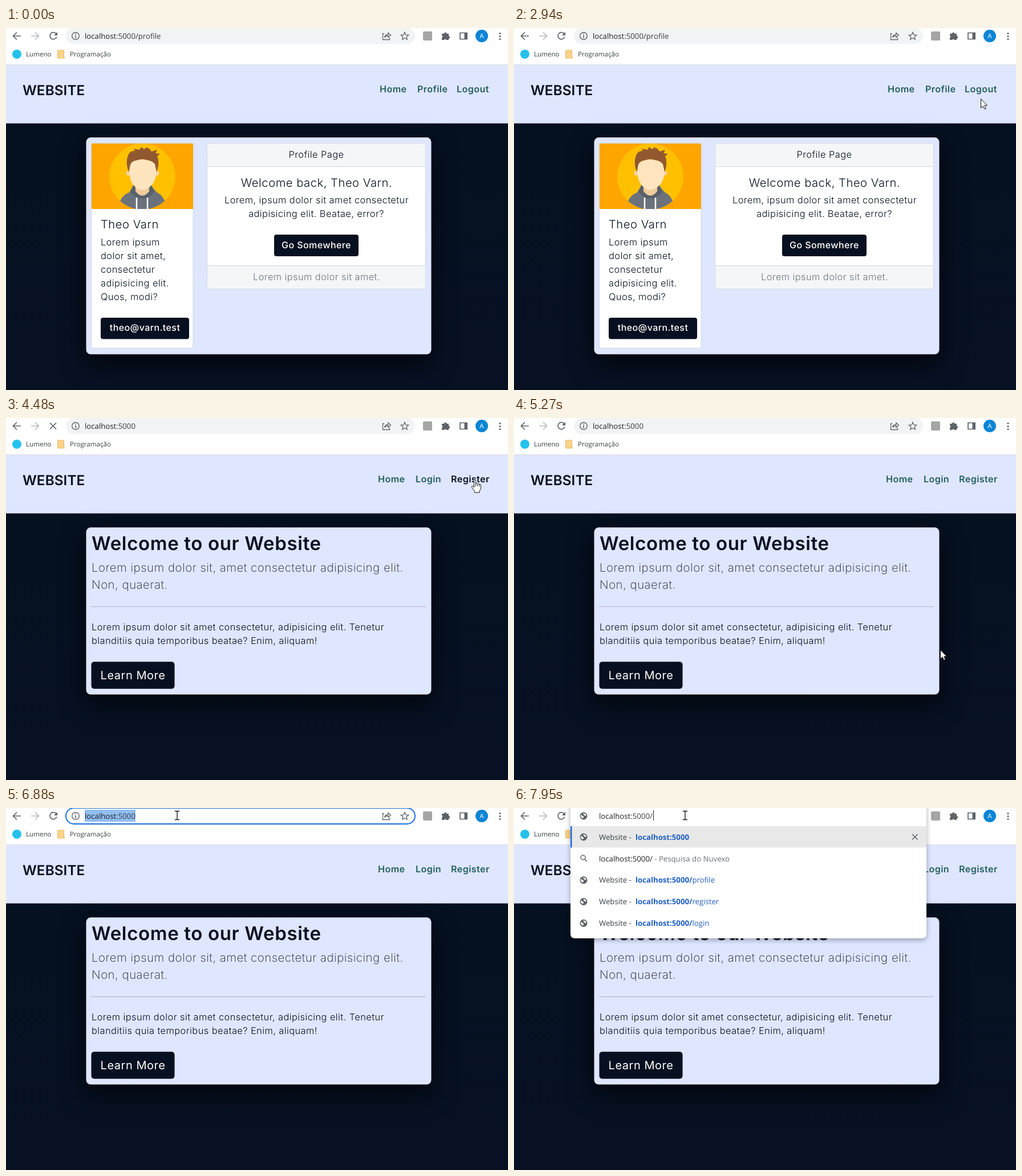
An HTML page for the animation above (8 s loop, 880 px wide and 636 px high).

```html
<!DOCTYPE html>
<html lang="pt">
<head>
<meta charset="utf-8">
<title>Website</title>
<style>
html,body{margin:0;width:100%;height:100%;overflow:hidden;background:#fff}
svg{display:block;width:880px;height:636px}
text{font-family:Inter,sans-serif;text-rendering:geometricPrecision;fill:#071020;white-space:pre}
.page text{letter-spacing:.026em}
.ui{font-family:"Open Sans",sans-serif;font-size:13.2px;fill:#3c4043}
.small{font-size:11.6px}
.nav text{font-size:16.1px;font-weight:600;fill:#235f60}
.nav text.hot{fill:#071020}
.p{font-size:16.4px;font-weight:300}
.h5{font-size:20.2px;font-weight:300}
.page .lead{font-size:20.4px;font-weight:200;fill:#1a2233}
.page .title{font-size:33px;font-weight:600;letter-spacing:.02em}
.btn{font-size:16px;font-weight:500}
.page .btn,.page .big{fill:#fff}
.mid{text-anchor:middle}
.shade{filter:drop-shadow(0 16px 22px rgba(0,0,0,.68))}
.ln{fill:none;stroke:#5f6368;stroke-width:1.7}
.bold{font-weight:700}
.blue{fill:#1f5fc4}
</style>
</head>
<body>
<svg viewBox="0 0 880 636">
  <defs>
    <linearGradient id="night" x2="0" y2="1"><stop stop-color="#051020"/><stop offset="1" stop-color="#071123"/></linearGradient>
    <clipPath id="photo"><rect x="150" y="203" width="178" height="115"/></clipPath>
    <clipPath id="disc"><circle cx="239" cy="261" r="58"/></clipPath>
    <g id="globe"><circle r="6.5" fill="#5f6368"/><path d="M-4.5-2.5Q-3 0 0 .5Q.5 2-1 4Q-5 3-5 0ZM0-5Q4-4 4.8-1Q2 1 1.5-1.5Q-1-2 0-5Z" fill="#fff"/></g>
  </defs>

  <g class="page">
    <rect y="65" width="880" height="103" fill="#dfe6ff"/>
    <rect y="167.600" width="880" height="469" fill="url(#night)"/>
    <text x="29" y="118" font-size="24.300" font-weight="600" style="letter-spacing:.003em">WEBSITE</text>

    <g id="profile">
      <g class="nav"><text x="655" y="113">Home</text><text x="721" y="113">Profile</text><text id="logout" x="790" y="113">Logout</text></g>
      <rect class="shade" x="140.500" y="192.300" width="605" height="381" rx="8" fill="#dfe6ff"/>
      <rect x="149.500" y="202.500" width="178.500" height="360" rx="3" fill="#fff" stroke="#d3d8e4"/>
      <g clip-path="url(#photo)">
        <rect x="150" y="203" width="178" height="115" fill="#ffa500"/>
        <circle cx="239" cy="261" r="58" fill="#ffc000"/>
        <g clip-path="url(#disc)">
          <path d="M196 319Q199 295 216 289Q221 280 224 275H254Q259 284 265 289Q279 296 282 319Z" fill="#6b727c"/>
          <path d="M224 275Q239 300 254 275L260 288Q239 312 218 288Z" fill="#59616b"/>
          <path d="M227 272H251V287Q239 302 227 287Z" fill="#f0cd9b"/>
          <path d="M229 298V318M248 298V318" stroke="#fff" stroke-width="2.500"/>
        </g>
        <circle cx="215" cy="255" r="4.500" fill="#f5d3a4"/><circle cx="264" cy="255" r="4.500" fill="#f5d3a4"/>
        <path d="M217 236Q239 225 263 237V260Q260 276 246 283Q239 286 232 283Q219 276 217 260Z" fill="#ffe5bd"/>
        <path d="M215 253Q209 236 214 224Q217 215 226 216L224 212L234 214L237 209L242 213L246 210Q252 211 255 217L265 214L262 220L270 221L265 225Q270 237 264 253L261 239Q256 233 247 232Q239 229 231 232Q221 233 218 240Z" fill="#91592f"/>
      </g>
      <text class="h5" x="166" y="352">Theo Varn</text>
      <g class="p" id="bio"></g>
      <rect x="166" y="509" width="155" height="37.500" rx="4" fill="#071020"/>
      <text class="btn mid" x="243.500" y="532">theo@varn.test</text>

      <rect x="352.500" y="202.500" width="383" height="256" rx="3" fill="#fff" stroke="#d3d8e4"/>
      <path d="M353 203H735V243.500H353ZM353 417.500H735V458H353Z" fill="#f4f6f7"/>
      <path d="M353 243.500H735M353 417.500H735" stroke="#d3d6d9"/>
      <g class="mid">
        <text class="p" x="544" y="228">Profile Page</text>
        <text class="h5" x="544.500" y="279">Welcome back, Theo Varn.</text>
        <text class="p" x="544.500" y="308">Lorem, ipsum dolor sit amet consectetur</text>
        <text class="p" x="544" y="332">adipisicing elit. Beatae, error?</text>
        <rect x="470" y="363" width="148" height="38" rx="4" fill="#071020"/>
        <text class="btn" x="544" y="387">Go Somewhere</text>
        <text class="p" x="544.500" y="443" style="fill:#6c757d">Lorem ipsum dolor sit amet.</text>
      </g>
    </g>

    <g id="home">
      <g class="nav"><text x="652" y="113">Home</text><text x="718" y="113">Login</text><text id="register" x="780" y="113">Register</text></g>
      <rect class="shade" x="140.500" y="192.300" width="605" height="293.500" rx="8" fill="#dfe6ff"/>
      <text class="title" x="150" y="232">Welcome to our Website</text>
      <text class="lead" x="150" y="270">Lorem ipsum dolor sit, amet consectetur adipisicing elit.</text>
      <text class="lead" x="150" y="300">Non, quaerat.</text>
      <path d="M149 331.500H736" stroke="#aeb5c8"/>
      <text class="p" x="150" y="373">Lorem ipsum dolor sit amet consectetur, adipisicing elit. Tenetur</text>
      <text class="p" x="150" y="397">blanditiis quia temporibus beatae? Enim, aliquam!</text>
      <rect x="149.500" y="428.200" width="146" height="47.500" rx="5" fill="#071020"/>
      <text class="mid big" x="222.500" y="459" font-size="20">Learn More</text>
    </g>
  </g>

  <rect width="880" height="64" fill="#fff"/>
  <path d="M0 64.500H880" stroke="#dcdee2"/>
  <path class="ln" d="M26 14H13M19 7.500L12.500 14L19 20.500"/>
  <path class="ln" d="M44 14H57M51 7.500L57.500 14L51 20.500" style="stroke:#b9bbbe"/>
  <g id="reload"><path class="ln" d="M87.800 10A6 6 0 1 0 88.800 15.500"/><path d="M90 7V13H84Z" fill="#5f6368"/></g>
  <path id="stop" class="ln" d="M77 8.500L88 19.500M88 8.500L77 19.500"/>
  <rect x="105" width="612" height="28" rx="14" fill="#f1f3f4"/>
  <rect id="ring" x="105" width="612" height="28" rx="14" fill="#fff" stroke="#1a6fe0" stroke-width="2"/>
  <circle class="ln" cx="122" cy="14" r="6.300" style="stroke-width:1.4"/>
  <path d="M122 10V11.600M122 13V18" stroke="#5f6368" stroke-width="1.600"/>
  <rect id="sel" x="138" y="3" width="89" height="21" fill="#90bdf2"/>
  <text class="ui" x="138" y="18.500"><tspan fill="#202124">localhost</tspan>:5000<tspan id="path">/profile</tspan></text>
  <path id="caret" d="M227.500 3V22" stroke="#202124"/>
  <g class="ln" style="stroke-width:1.3">
    <path d="M663 10H660.500V20.500H672.500V17M663.500 16.500Q664.500 11.500 670 11.500V8.500L674.500 12.500L670 16.500V13.700Q666 13.500 663.500 16.500Z"/>
    <path d="M699 7.500L700.900 12L705.700 12.400L702 15.500L703.200 20.200L699 17.700L694.800 20.200L696 15.500L692.300 12.400L697.100 12Z"/>
    <path d="M796 8.500H808V19.500H796Z" style="stroke-width:1.7"/>
  </g>
  <rect x="731" y="6" width="16" height="16" rx="2" fill="#a5a5a5"/>
  <path d="M764 10H768A2.200 2.200 0 0 1 772.400 10H776V14A2.200 2.200 0 0 1 776 18.400V21H772A2.200 2.200 0 0 0 768 21H764V17A2.200 2.200 0 0 0 764 13Z" fill="#5f6368"/>
  <path d="M803.500 8H809V20H803.500Z" fill="#5f6368"/>
  <circle cx="834" cy="14" r="11" fill="#0a85d5"/>
  <text class="ui small mid" x="834" y="18" style="fill:#fff">A</text>
  <g fill="#5f6368"><circle cx="866" cy="9.500" r="1.600"/><circle cx="866" cy="14.500" r="1.600"/><circle cx="866" cy="19.500" r="1.600"/></g>
  <circle cx="19" cy="46" r="8" fill="#25c1ec"/>
  <text class="ui small" x="35" y="50">Lumeno</text>
  <path d="M91.500 39H101.500V50L103 53H91.500Q90.500 53 90.500 52V40Q90.500 39 91.500 39Z" fill="#fad38a" stroke="#e5b868"/>
  <text class="ui small" x="112" y="50">Programação</text>

  <g id="drop">
    <path d="M99-8H723V221Q723 229 715 229H107Q99 229 99 221Z" fill="#fff" style="filter:drop-shadow(0 3px 5px rgba(0,0,0,.32))"/>
    <path d="M99 32H723V69.500H99Z" fill="#e8e8e8"/>
    <path d="M99 32H101.500V69.500H99Z" fill="#1a6fe0"/>
    <path class="ln" d="M698 46L707.500 55.500M707.500 46L698 55.500" style="stroke-width:1.5"/>
    <use href="#globe" x="122" y="14"/>
    <text class="ui" x="149" y="18.500"><tspan fill="#202124">localhost</tspan>:5000/</text>
    <path d="M244.500 4V22" stroke="#202124"/>
    <circle class="ln" cx="121" cy="87" r="4" style="stroke-width:1.5"/><path class="ln" d="M124 90L128 94"/>
    <text class="ui" x="149" y="93.500"><tspan fill="#202124">localhost:5000/</tspan><tspan fill="#6b6f73"> - Pesquisa do Nuvexo</tspan></text>
    <g id="rows"></g>
  </g>

  <g id="cursor">
    <path id="arrow" d="M.5 .5V16.500L4.200 12.900L6.700 18.500L9.200 17.400L6.800 11.900H11.500Z" fill="#fff" stroke="#111"/>
    <path id="hand" d="M-1.500 12V1.500Q-1.500 0 0 0T1.500 1.500V7Q4 5.500 4.700 7.500Q7 6.300 7.800 8.500Q10.300 8 10.300 10.500V15Q10 18.500 8 20V23H-.5V20.500L-5 14.500Q-6.500 12 -4.500 11.500Q-3 11.500-1.500 14ZM1.500 7V12M4.700 7.500V12M7.800 8.500V12" fill="#fff" stroke="#111"/>
    <path id="beam" d="M-4-7.500H-1L0-6.500L1-7.500H4M0-6.500V6.500M-4 7.500H-1L0 6.500L1 7.500H4" fill="none" stroke="#111" stroke-width="1.300"/>
  </g>
</svg>
<script>
const $ = id => document.getElementById(id);
const LOOP = 8000;

function add(parent, tag, attrs, str = '') {
  const el = document.createElementNS('http://www.w3.org/2000/svg', tag);
  for (const k in attrs) el.setAttribute(k, attrs[k]);
  el.textContent = str;
  parent.append(el);
  return el;
}

['Lorem ipsum', 'dolor sit amet,', 'consectetur', 'adipisicing elit.', 'Quos, modi?']
  .forEach((s, i) => add($('bio'), 'text', { x: 166, y: 382 + 24 * i }, s));

[[51, ''], [126.7, 'profile'], [164.5, 'register'], [202.3, 'login']].forEach(([y, page]) => {
  const rows = $('rows'), base = y + 4.7;
  add(rows, 'use', { href: '#globe', x: 122, y });
  add(rows, 'text', { class: 'ui', x: 149, y: base }, 'Website - ');
  const url = add(rows, 'text', { class: 'ui blue', x: 213, y: base });
  add(url, 'tspan', { class: 'bold' }, 'localhost:5000' + (page && '/'));
  add(url, 'tspan', {}, page);
});

// Pointer moves: start, end, steps, four Bezier points
const moves = [
  [1120, 1710, 10, [872, 634], [840, 480], [785, 340], [760, 343]],
  [2380, 3070, 10, [760, 343], [757, 290], [815, 150], [822, 108]],
  [5070, 5870, 13, [822, 108], [800, 680], [320, 680], [261, 63]],
  [5950, 6690, 11, [261, 63], [268, 45], [290, 20], [311, 13]]
];
const nudges = [[6760, 308], [6820, 304], [6880, 300], [6950, 292], [7150, 300]];

function bezier(a, b, c, d, u) {
  const v = 1 - u;
  return [0, 1].map(k => v*v*v*a[k] + 3*v*v*u*b[k] + 3*v*u*u*c[k] + u*u*u*d[k]);
}

function pointer(t) {
  let pos = null;
  for (const [from, to, n, ...pts] of moves) {
    if (t < from) break;
    const step = Math.min(n, Math.floor((t - from) / (to - from) * (n - 1) + 1e-6) + 1);
    const u = step / n;
    pos = bezier(...pts, u * u * (3 - 2 * u));
  }
  for (const [at, x] of nudges) if (t >= at) pos = [x, 13];
  return pos;
}

function show(id, on) { $(id).style.display = on ? '' : 'none'; }

function draw(t) {
  const home = t >= 4480, focus = t >= 6620;
  const loading = t >= 3350 && t < 4870;
  const pos = pointer(t);
  let kind = '';
  if (pos) {
    const [x, y] = pos;
    kind = y < 28 ? 'beam' : y > 95 && y < 122 && x > 780 ? 'hand' : 'arrow';
    $('cursor').setAttribute('transform', `translate(${Math.round(x)} ${Math.round(y)})`);
  }
  for (const k of ['arrow', 'hand', 'beam']) show(k, k === kind);
  $('logout').classList.toggle('hot', kind === 'hand');
  $('register').classList.toggle('hot', kind === 'hand');
  show('profile', !home);
  show('home', home);
  show('path', t < 3620);
  show('stop', loading);
  show('reload', !loading);
  show('ring', focus);
  show('sel', focus && t < 6950);
  show('caret', t >= 6950 && t < 7470);
  show('drop', t >= 7870);
}

function tick() {
  draw(performance.now() % LOOP);
  requestAnimationFrame(tick);
}
tick();
</script>
</body>
</html>
```
